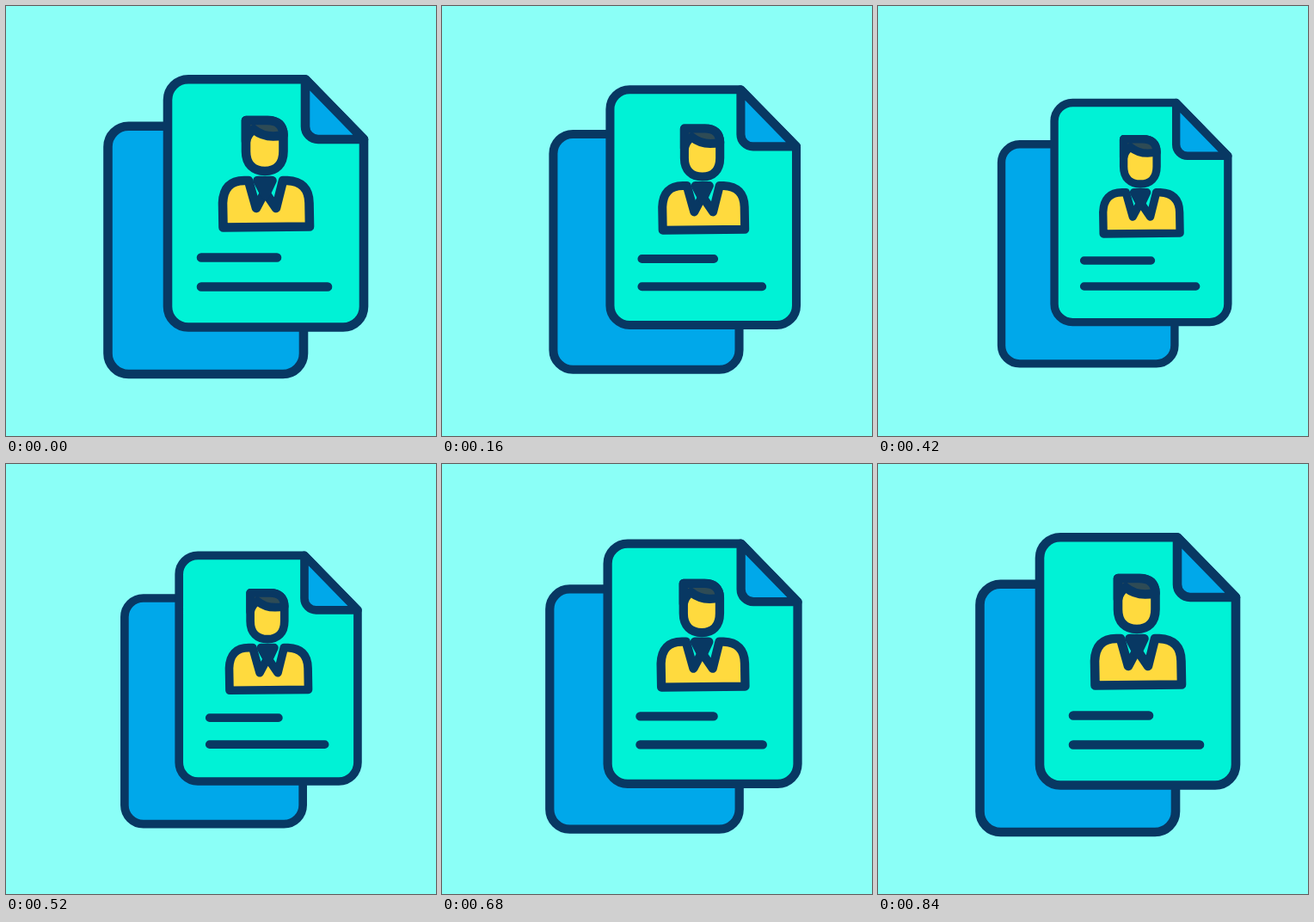
Animation of 500x500 px, one loop 3 s. Source, as an HTML page:

```html
<!DOCTYPE html>
<html lang="en">
<head>
<meta charset="utf-8">
<title>Profile documents</title>
<style>
  html, body { margin: 0; width: 100%; height: 100%; overflow: hidden; background: #8bfff7; }
  svg { display: block; width: 100%; height: 100%; }
  .ink { stroke: #083863; stroke-width: 10.6; stroke-linecap: round; stroke-linejoin: round; fill: none; }
  .blue { fill: #00a8ea; }
  .green { fill: #00f2d6; }
  .skin { fill: #ffda3e; }
  .hair { fill: #2e4b55; }
</style>
</head>
<body>
<svg viewBox="0 0 500 500">
  <g id="icon" class="ink">
    <rect class="blue" x="118.5" y="139.8" width="227.5" height="288.2" rx="24"/>

    <!-- front page and folded corner -->
    <path class="green" d="M348 85.3H212a24 24 0 0 0-24 24V349.500a24 24 0 0 0 24 24H392a24 24 0 0 0 24-24V155L348 85.300Z"/>
    <path class="blue" d="M348 85.3V140a15 15 0 0 0 15 15H416Z"/>

    <!-- head -->
    <path class="skin" d="M279 133H304Q322 133 322.500 150V169C322.500 184 314 192 301 192S279 184 279 169Z"/>
    <path class="hair" d="M279 157V133H304Q322 133 322.500 150Q302 155 288 143.500Q281 148 279 157Z"/>

    <!-- jacket, lapels and tie -->
    <path class="skin" d="M252.500 257.500L252 229Q253 203 277 203H282L291 235L301 216L314 235L322 203H327Q352 204 352.500 229L353 256.500Z"/>
    <path d="M292.500 203H309.500L301.500 220Z"/>

    <path d="M227 292.500H315M227 326.500H374"/>
  </g>
</svg>
<script>
  const LOOP = 3000, STEP = 20;
  const SHRINK_END = 360, GROW_END = 840, DEPTH = 0.12;
  const PIVOT_X = 336.5, PIVOT_Y = 322.5;
  const icon = document.getElementById('icon');

  const ease = p => p * p * (3 - 2 * p);

  function scaleAt(t) {
    if (t >= GROW_END) return 1;
    const press = t < SHRINK_END
      ? ease(t / SHRINK_END)
      : 1 - ease((t - SHRINK_END) / (GROW_END - SHRINK_END));
    return 1 - DEPTH * press;
  }

  function render(now) {
    const t = Math.floor((now % LOOP) / STEP) * STEP;
    icon.setAttribute('transform',
      `translate(${PIVOT_X} ${PIVOT_Y}) scale(${scaleAt(t)}) translate(${-PIVOT_X} ${-PIVOT_Y})`);
  }

  const start = performance.now();
  function tick() {
    render(performance.now() - start);
    requestAnimationFrame(tick);
  }
  tick();
</script>
</body>
</html>
```
